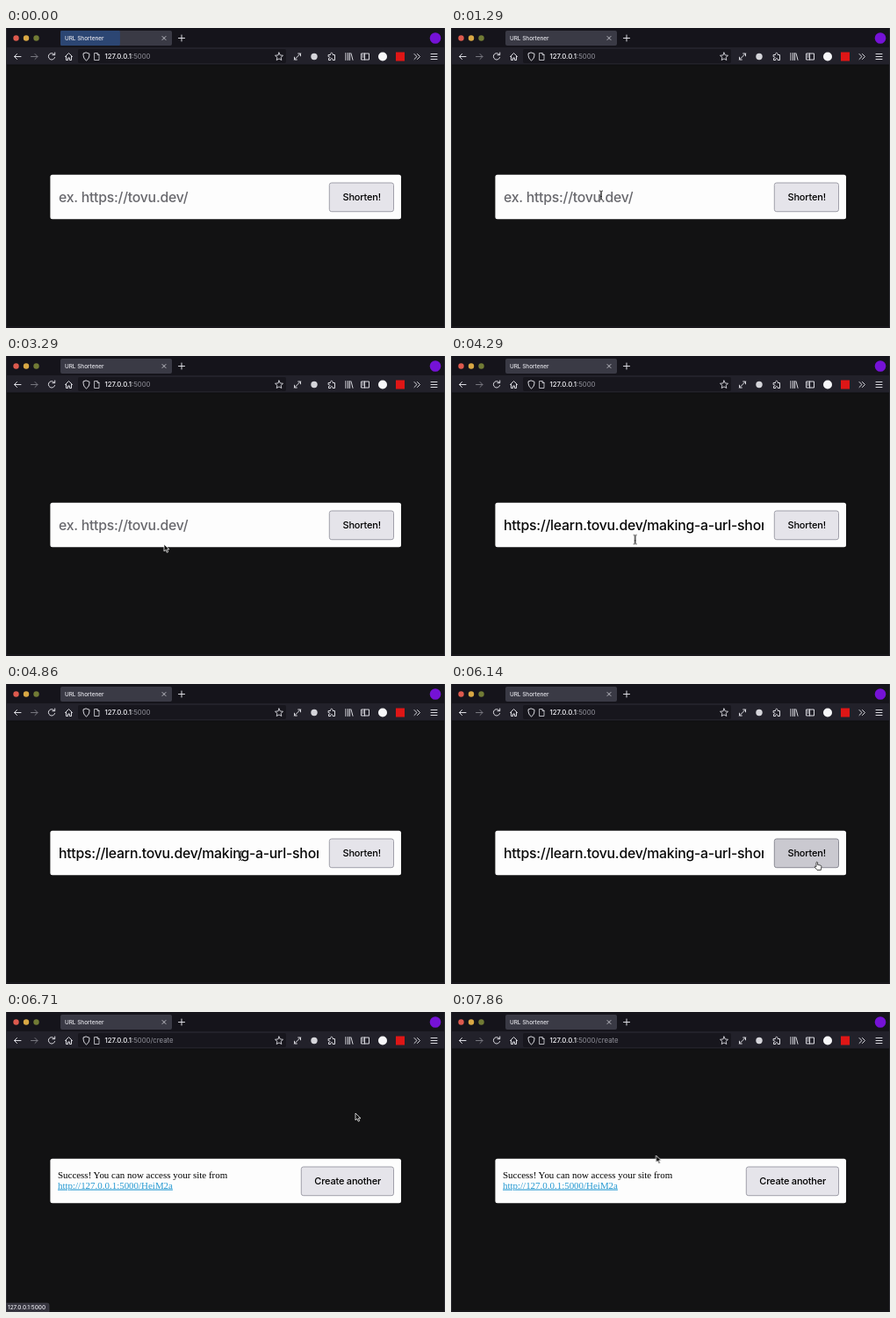
Recreate the animation shown at these times as an HTML page. Size 500 by 341 pixels, loop 8000 ms.

```html
<!DOCTYPE html>
<html lang="en">
<head>
<meta charset="utf-8">
<title>URL Shortener</title>
<style>
  html, body { margin: 0; width: 100%; height: 100%; overflow: hidden; background: #121213; }
  svg { display: block; width: 100%; height: 100%; }
  text { font-family: Inter, Roboto, sans-serif; white-space: pre; }
  .icons { fill: none; stroke: #dcdce2; stroke-width: 1; stroke-linecap: round; stroke-linejoin: round; }
  .small { font-size: 6.4px; font-weight: 500; fill: #e6e6ec; }
  .address { font-size: 7.8px; font-weight: 500; fill: #f4f4f8; }
  .dim { font-weight: 400; fill: #92929b; }
  .input { font-size: 15.8px; font-weight: 450; letter-spacing: -.23px; }
  .label { font-size: 11px; letter-spacing: -.2px; font-weight: 500; text-anchor: middle; }
  .serif { font: 10.95px "Liberation Serif", serif; }
  .button { fill: #e5e4ea; stroke: #a0a0aa; }

  /* One loop is 56 ticks; each tick is 1.7857%. */
  .anim { animation: 8s -5ms step-end infinite; }
  #cursor { animation-name: travel; }
  #arrow { animation-name: arrow; }
  #beam { animation-name: beam; }
  #hand { animation-name: hand; }
  #caret { animation-name: caret; }
  #burst { animation-name: burst; transform-origin: 62px 0; }
  #hint { animation-name: hint; }
  #typed { animation-name: typed; }
  #form { animation-name: form; }
  .result { animation-name: result; }
  #status { animation-name: status; }
  .button { animation-name: hover; }

  @keyframes travel {
    0%, 3.57% { transform: translate(258px, 238px); animation-timing-function: steps(6); }
    14.29%, 19.64% { transform: translate(171px, 190px); animation-timing-function: steps(3); }
    25% { transform: translate(178px, 221px); animation-timing-function: steps(2); }
    28.57%, 37.5% { transform: translate(180px, 213px); }
    39.29%, 48.21% { transform: translate(180px, 214px); }
    50% { transform: translate(181px, 215px); animation-timing-function: steps(6); }
    60.71%, 64.29% { transform: translate(267px, 195px); animation-timing-function: steps(4); }
    71.43%, 78.57% { transform: translate(417px, 202px); }
    80.36% { transform: translate(415px, 194px); }
    82.14% { transform: translate(405px, 150px); }
    83.93%, 85.71% { transform: translate(398px, 115px); animation-timing-function: steps(7); }
    98.21%, 100% { transform: translate(233.5px, 163px); }
  }
  @keyframes arrow {
    0% { visibility: hidden; }
    3.57% { visibility: visible; }
    8.93% { visibility: hidden; }
    23.21% { visibility: visible; }
    53.57% { visibility: hidden; }
    82.14%, 100% { visibility: visible; }
  }
  @keyframes beam {
    0% { visibility: hidden; }
    8.93% { visibility: visible; }
    23.21% { visibility: hidden; }
    53.57% { visibility: visible; }
    69.64%, 100% { visibility: hidden; }
  }
  @keyframes hand {
    0% { visibility: hidden; }
    69.64% { visibility: visible; }
    82.14%, 100% { visibility: hidden; }
  }
  @keyframes caret {
    0%, 26.79%, 39.29%, 51.79%, 100% { opacity: 0; }
    19.64%, 32.14%, 44.64% { opacity: 1; }
  }
  @keyframes burst {
    0%, 78.57% { transform: scaleX(.535); opacity: 1; }
    1.79%, 80.36% { transform: scaleX(.85); opacity: .75; }
    3.57%, 82.14% { transform: none; opacity: .35; }
    5.36%, 83.93%, 100% { transform: none; opacity: 0; }
  }
  @keyframes hint { 0% { opacity: 1; } 51.79%, 100% { opacity: 0; } }
  @keyframes typed { 0% { opacity: 0; } 51.79%, 100% { opacity: 1; } }
  @keyframes form { 0% { visibility: visible; } 78.57%, 100% { visibility: hidden; } }
  @keyframes result { 0% { visibility: hidden; } 78.57%, 100% { visibility: visible; } }
  @keyframes status {
    0% { opacity: 0; }
    80.36% { opacity: 1; }
    89.29% { opacity: .5; }
    91.07%, 100% { opacity: 0; }
  }
  @keyframes hover {
    0%, 82.14%, 100% { fill: #e5e4ea; stroke: #a0a0aa; }
    69.64% { fill: #cac9d0; stroke: #8b8b95; }
  }
</style>
</head>
<body>
<svg viewBox="0 0 500 341" preserveAspectRatio="none">
  <defs>
    <clipPath id="inputClip"><rect x="59" y="176" width="297" height="34"/></clipPath>
  </defs>

  <rect width="500" height="341" fill="#121213"/>
  <rect width="500" height="22" fill="#15141b"/>
  <rect y="22" width="500" height="20" fill="#22212a"/>
  <path d="M0 42H500" stroke="#0c0c0f"/>
  <path d="M.5 0V341M499.5 0V341" stroke="#29292e"/>
  <path d="M0 340H500" stroke="#211d25"/>

  <!-- Tab strip -->
  <circle cx="11.5" cy="11.5" r="3.2" fill="#dd5a4e"/>
  <circle cx="23" cy="11.5" r="3.2" fill="#d9a844"/>
  <circle cx="34.5" cy="11.5" r="3.2" fill="#717b35"/>
  <rect x="62" y="3" width="127" height="17" rx="2" fill="#3a3a45"/>
  <rect id="burst" class="anim" x="62" y="3" width="127" height="17" rx="2" fill="#2c4673"/>
  <text class="small" x="67" y="14">URL Shortener</text>
  <circle cx="489" cy="11.5" r="6.3" fill="#7512d6"/>

  <!-- Toolbar -->
  <rect x="82" y="24" width="237" height="16" rx="2" fill="#17161d"/>
  <g class="icons">
    <path d="M178 9.5l4 4m0-4l-4 4" stroke-width=".8"/>
    <path d="M200 8v7M196.500 11.500h7"/>
    <path d="M17 32.500H9.500m3-3l-3 3 3 3"/>
    <path d="M28.500 32.500H36m-3-3l3 3-3 3" stroke="#77777f"/>
    <path d="M55.300 30.500a3.700 3.700 0 1 0 .3 3M55.700 28v2.700H53"/>
    <path d="M67.500 32.500l4-4 4 4M68.500 32v4.500h2V34h2v2.500h2V32"/>
    <path d="M91.500 28l3.500 1.300c0 4-1 6-3.500 7.700-2.500-1.700-3.500-3.700-3.500-7.700z"/>
    <path d="M101 28.500h3l2 2v6h-5zM104 28.500v2h2" stroke-width=".8"/>
    <path d="M311 28l1.300 2.900 3.200.4-2.400 2.100.7 3.100-2.800-1.600-2.800 1.600.7-3.100-2.400-2.100 3.200-.4z" stroke-width=".9"/>
    <path d="M328.500 36l7-7M332.700 29h2.800v2.800M328.500 33.200V36h2.800"/>
    <path d="M367.500 30.500h2c-.6-3 3.200-3 2.600 0h2.400v6h-2.300c.3-2.600-2.800-2.600-2.500 0h-2.200v-2c2 .2 2-2.200 0-2z"/>
    <path d="M387 28.500v8M389.500 28.500v8M391.500 28.500v8M393 28.800l2 7.500"/>
    <path d="M405 29h8.500v7H405zM408.500 29v7M406 31h1.300M406 33h1.300"/>
    <path d="M465 29.500l3 3-3 3m3.500-6l3 3-3 3"/>
    <path d="M484 29.500h7m-7 3h7m-7 3h7"/>
  </g>
  <circle cx="351" cy="32.500" r="3.700" fill="#d5d5da"/>
  <circle cx="429" cy="32.500" r="5" fill="#f7f7f9"/>
  <rect x="444" y="27.500" width="10" height="10" fill="#df1616"/>
  <text class="address" x="112.500" y="35.200">127.0.0.1<tspan class="dim">:5000<tspan class="result anim">/create</tspan></tspan></text>

  <!-- Page -->
  <rect x="50.400" y="166.800" width="399.600" height="50.500" rx="2.500" fill="#fdfdfd"/>

  <g id="form" class="anim">
    <g class="input" clip-path="url(#inputClip)">
      <text id="hint" class="anim" x="60" y="198.200" fill="#68686d">ex. https://tovu.dev/</text>
      <text id="typed" class="anim" x="60" y="198.200" fill="#080808">https://learn.tovu.dev/making-a-url-shortener</text>
    </g>
    <path id="caret" class="anim" d="M60.500 183V202" stroke="#222"/>
    <rect class="button anim" x="368.300" y="176" width="73.200" height="32.700" rx="2.500"/>
    <text class="label" x="405.200" y="196.300">Shorten!</text>
  </g>

  <g class="result anim">
    <text class="serif" x="59" y="189">Success! You can now access your site from</text>
    <text class="serif" x="59" y="200.500" fill="#2599d2" text-decoration="underline">http://127.0.0.1:5000/HeiM2a</text>
    <rect class="button anim" x="336.300" y="176" width="105.200" height="32.700" rx="2.500"/>
    <text class="label" x="389.200" y="196.300">Create another</text>
  </g>

  <g id="status" class="anim">
    <path d="M0 331H47q2 0 2 2V341H0z" fill="#34333d" stroke="#4b4a54" stroke-width=".6"/>
    <text class="small" x="2" y="338.300">127.0.0.1:5000</text>
  </g>

  <g id="cursor" class="anim">
    <path id="arrow" class="anim" d="M0 0V8l1.900-1.700 1.300 3 1.500-.6-1.300-2.900H6z" fill="#111" stroke="#f4f4f4" stroke-width=".8"/>
    <g id="beam" class="anim" fill="none">
      <path d="M-2-5q2 0 2 1.500V4q0 1.500-2 1.500M2-5Q0-5 0-3.500V4q0 1.500 2 1.500" stroke="#fff" stroke-width="2"/>
      <path d="M-2-5q2 0 2 1.500V4q0 1.500-2 1.500M2-5Q0-5 0-3.500V4q0 1.500 2 1.500M-1 1.500h2" stroke="#222" stroke-width=".9"/>
    </g>
    <path id="hand" class="anim" d="M-1 5V.8q.8-1.200 1.600 0v2.700l3.400.7q1 .4.9 1.500L4.300 9.500H0L-3 5.800q.5-1.300 2-.1z" fill="#fff" stroke="#222" stroke-width=".8" stroke-linejoin="round"/>
  </g>
</svg>
</body>
</html>
```
